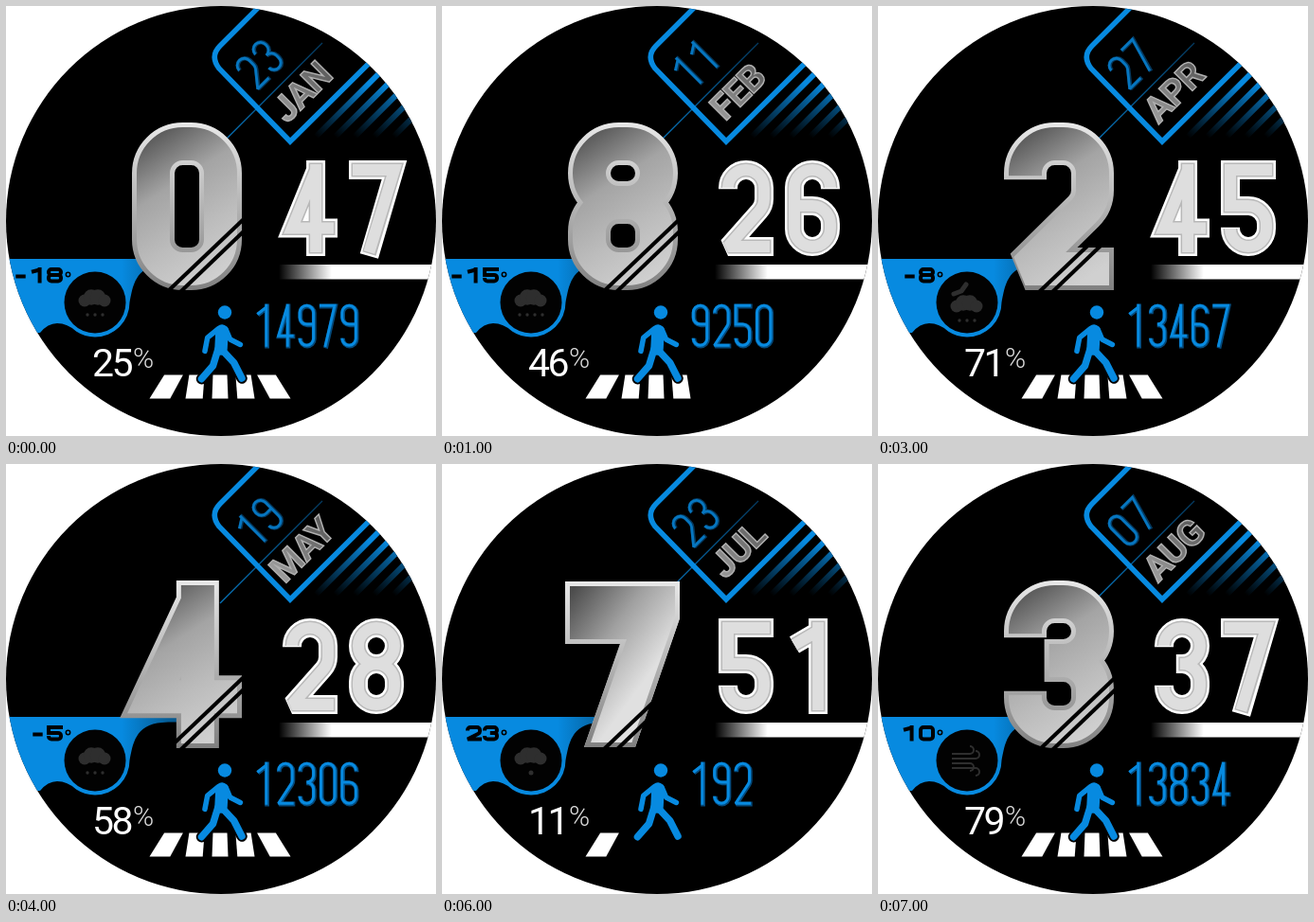
Recreate the animation shown at these times as an HTML page with a canvas. Size 454 px wide and 454 px high, loop 8 s.

```html
<!DOCTYPE html>
<html lang="en">
<head>
<meta charset="utf-8">
<title>Watch face</title>
<style>
html, body { margin: 0; width: 100%; height: 100%; overflow: hidden; background: #fff; }
canvas { display: block; width: 454px; height: 454px; }
</style>
</head>
<body>
<canvas id="face" width="454" height="454"></canvas>
<script>
const ctx = document.getElementById('face').getContext('2d');
const BLUE = '#078ae0';
const STEP_MS = 1000;

// month, day, hour, minute, temperature, weather, battery, steps
const states = [
  'JAN 23 0 47 -18 rain 25 14979',
  'FEB 11 8 26 -15 snow 46 9250',
  'MAR 15 7 32 0 snow 3 6491',
  'APR 27 2 45 -8 moon 71 13467',
  'MAY 19 4 28 -5 rain 58 12306',
  'JUN 03 5 43 -13 drop 13 5640',
  'JUL 23 7 51 23 drop 11 192',
  'AUG 07 3 37 10 wind 79 13834',
].map(text => text.split(' '));

// Each digit walks over named nodes; a capital letter rounds that corner.
const walks = {
  0: 'hBFEAh', 1: 'ij xy', 2: 'sABDer', 3: 'sABDg gDFEu', 4: 'zwo xy',
  5: 'qacDFEu', 6: 'tBAEFDc', 7: 'pbn', 8: 'hBDCAh kDFECk', 9: 'uEFBACd', '-': 'lm',
};

// e and f are half the stroke relative to the width and height of the box.
function nodes(e, f) {
  const mid = 0.47, end = 0.15 + 0.8 * f, stem = 0.66, bar = 0.76;
  return {
    a: [0, 0], b: [1, 0], c: [0, mid], d: [1, mid], e: [0, 1], f: [1, 1],
    h: [.5, 0], k: [.5, mid], g: [.6 - e, mid],
    s: [0, end], t: [1, end], u: [0, 1 - end],
    p: [-e, 0], q: [1 + e, 0], r: [1 + e, 1], n: [.3, 1 + f],
    i: [0, .22], j: [stem, .04], x: [stem, -f], y: [stem, 1 + f],
    z: [1 + e, bar], w: [0, bar], o: [stem, 0], l: [.1, .6], m: [.9, .6],
  };
}

function digit(d, x, y, w, h, width, color) {
  const r = Math.min(w / 2, h * 0.235);
  const grid = nodes(width / 2 / w, width / 2 / h);
  const at = key => {
    const [px, py] = grid[key.toLowerCase()];
    return [x + px * w, y + py * h];
  };
  ctx.beginPath();
  for (const walk of walks[d].split(' ')) {
    [...walk].forEach((key, i) => {
      if (!i) ctx.moveTo(...at(key));
      else if (key < 'a') ctx.arcTo(...at(key), ...at(walk[i + 1]), r);
      else ctx.lineTo(...at(key));
    });
  }
  ctx.lineCap = 'butt';
  ctx.lineJoin = 'miter';
  ctx.miterLimit = 2;
  ctx.lineWidth = width;
  ctx.strokeStyle = color;
  ctx.stroke();
}

function number(text, x, y, w, h, pitch, width, color) {
  [...text].forEach((d, i) => digit(d, x + i * pitch, y, w, h, width, color));
}

function gradient(x0, y0, x1, y1, ...colors) {
  const g = ctx.createLinearGradient(x0, y0, x1, y1);
  colors.forEach((c, i) => g.addColorStop(i / (colors.length - 1), c));
  return g;
}

function line(pts, width, color, cap = 'butt') {
  ctx.beginPath();
  pts.forEach(([x, y]) => ctx.lineTo(x, y));
  ctx.lineWidth = width;
  ctx.strokeStyle = color;
  ctx.lineCap = cap;
  ctx.lineJoin = cap === 'round' ? 'round' : 'miter';
  ctx.stroke();
}

function polygon(pts, color) {
  ctx.beginPath();
  pts.forEach(([x, y]) => ctx.lineTo(x, y));
  ctx.closePath();
  ctx.fillStyle = color;
  ctx.fill();
}

function disc(x, y, r, color) {
  ctx.beginPath();
  ctx.arc(x, y, r, 0, 7);
  ctx.fillStyle = color;
  ctx.fill();
}

function tilted(x, y, draw) {
  ctx.save();
  ctx.translate(x, y);
  ctx.rotate(-Math.PI / 4);
  draw();
  ctx.restore();
}

function drawDate(day, month) {
  line([[334, 39], [226, 147]], 1.2, gradient(334, 39, 226, 147, '#043a60', '#0776be'));
  ctx.save();
  ctx.beginPath();
  ctx.rect(300, 0, 154, 139);
  ctx.clip();
  for (let i = 0; i < 5; i++) {
    const sum = 465 + i * 20.5;
    line([[sum - 140, 140], [sum - 40, 40]], 6, gradient(sum - 138, 138, sum - 82, 82, '#000', BLUE));
  }
  ctx.restore();

  ctx.beginPath();
  ctx.moveTo(272, -4);
  ctx.lineTo(226, 42);
  ctx.quadraticCurveTo(215, 53, 225, 66);
  ctx.lineTo(300, 143);
  ctx.lineTo(420, 24);
  ctx.lineWidth = 5.5;
  ctx.lineJoin = 'miter';
  ctx.strokeStyle = BLUE;
  ctx.stroke();

  tilted(267.5, 61, () => {
    number(day, -19.5, -17, 15, 35, 24, 4.5, '#04395f');
    number(day, -20, -17.5, 15, 35, 24, 2.8, '#0676c0');
  });
  tilted(312, 90.5, () => {
    ctx.font = '700 38px Roboto, sans-serif';
    ctx.letterSpacing = '-1px';
    ctx.textAlign = 'center';
    ctx.lineWidth = 1.5;
    ctx.strokeStyle = '#b0b0b0';
    ctx.fillStyle = gradient(-36, 0, 36, 0, '#9c9c9c', '#5c5c5c');
    ctx.fillText(month, 0, 13.5);
    ctx.strokeText(month, 0, 13.5);
    ctx.letterSpacing = '0px';
  });
}

function drawPanel() {
  const x = 94, y = 313, r = 36.5;
  ctx.beginPath();
  ctx.moveTo(0, 267);
  ctx.lineTo(215, 267);
  ctx.bezierCurveTo(206, 276, 185, 271, 165, 273);
  ctx.bezierCurveTo(136, 275, 134, 296, x + r, y);
  ctx.arc(x, y, r, 0, 2.15);
  ctx.quadraticCurveTo(65, 335, 54, 335);
  ctx.quadraticCurveTo(44, 335, 36, 345);
  ctx.lineTo(0, 345);
  ctx.closePath();
  ctx.fillStyle = gradient(122, 0, 215, 0, BLUE, '#05609c', '#02365a');
  ctx.fill();
  disc(x, y, r - 4, '#020202');
}

function drawSky(kind) {
  const gray = '#2e2e2e';
  if (kind === 'wind') {
    for (let i = 0; i < 4; i++) {
      const y = 306 + i * 5, turn = i < 2 ? -1 : 1, tip = 97 + (i % 2) * 6;
      ctx.beginPath();
      ctx.moveTo(78, y);
      ctx.lineTo(tip, y);
      ctx.arc(tip, y + turn * 4, 4, -turn * Math.PI / 2, turn * Math.PI / 2, turn < 0);
      ctx.lineWidth = 2;
      ctx.strokeStyle = gray;
      ctx.stroke();
    }
    return;
  }
  const moon = kind === 'moon', top = moon ? 317 : 311;
  if (moon) line([[80, 304], [88, 301], [93, 294]], 5, gray, 'round');
  for (let i = 0; i < 4; i++) {
    const bulge = Math.sin(i * Math.PI / 3);
    disc(83 + i * 7, top - bulge * 4, 6.5 + bulge * 2, gray);
  }
  const count = { drop: 1, rain: 3, snow: 4 }[kind] || 3;
  for (let i = 0; i < count; i++) {
    disc(94 + (i - (count - 1) / 2) * 8, top + 15, count > 1 ? 1.7 : 2.5, gray);
  }
}

function drawTemp(temp) {
  number(temp, 45 - (temp.length - 1) * 18, 278, 13, 12.5, 18, 4, '#000');
  ctx.beginPath();
  ctx.arc(65.5, 283.5, 2.2, 0, 7);
  ctx.lineWidth = 1.5;
  ctx.strokeStyle = '#000';
  ctx.stroke();
}

function drawHour(hour) {
  const rim = gradient(0, 123, 0, 300, '#e8e8e8', '#b4b4b4', '#808080');
  const fill = gradient(138, 150, 225, 285, '#5c5c5c', '#a4a4a4', '#bcbcbc', '#d0d0d0');
  if (hour === '7') {
    ctx.save();
    polygon([[130, 124], [251, 124], [251, 163], [204, 299], [150, 299], [188, 190], [130, 190]],
      gradient(140, 130, 235, 200, '#4c4c4c', '#a0a0a0', '#e0e0e0'));
    ctx.clip();
    ctx.lineWidth = 10;
    ctx.strokeStyle = rim;
    ctx.stroke();
    ctx.restore();
  } else {
    digit(hour, 155.5, 145.5, 71, 132, 45, rim);
    digit(hour, 155.5, 145.5, 71, 132, 35, fill);
  }
  line([[170, 302], [252, 224]], 4, '#000');
  line([[184, 302], [254, 235]], 4, '#000');
}

function drawMinutes(min) {
  for (const [width, color] of [[20, '#fff'], [15, '#b8b8b8'], [12, '#dedede']]) {
    number(min, 302, 173, 38, 81, 70, width, color);
  }
  ctx.fillStyle = gradient(288, 0, 344, 0, '#000', '#fff');
  ctx.fillRect(288, 273, 166, 15.5);
}

function drawBattery(level) {
  ctx.textAlign = 'left';
  ctx.fillStyle = '#fff';
  ctx.font = '400 41px Roboto, sans-serif';
  ctx.letterSpacing = '-2.5px';
  ctx.fillText(level, 91, 391);
  const x = 91 + ctx.measureText(level).width;
  ctx.letterSpacing = '0px';
  ctx.font = '300 30px Roboto, sans-serif';
  ctx.fillStyle = '#ddd';
  ctx.fillText('%', x + 2, 382);
}

function drawCrossing(steps) {
  const bars = Math.min(5, 1 + Math.floor(steps / 3000));
  for (let i = 0; i < bars; i++) {
    const u = i - 2;
    const top = 226 + 24.5 * u, topHalf = 7.5 + 0.6 * u * u;
    const base = 226 + 23 * u + 4.4 * u * Math.abs(u), baseHalf = 8.5 + 0.6 * u * u;
    polygon([[top - topHalf, 389.5], [top + topHalf, 389.5], [base + baseHalf, 414.5], [base - baseHalf, 414.5]], '#fff');
  }
}

// A two-part limb; angles are degrees from straight down, positive to the right.
function limb(x, y, upper, lower, length, width, color) {
  const pts = [[x, y]];
  for (const angle of [upper, lower]) {
    const a = angle * Math.PI / 180;
    x += Math.sin(a) * length;
    y += Math.cos(a) * length;
    pts.push([x, y]);
  }
  line(pts, width, color, 'round');
}

function drawWalker() {
  for (const [extra, color] of [[4, '#000'], [0, BLUE]]) {
    limb(224, 341, -51, -11, 14.5, 5.5 + extra, color);
    limb(232, 341, 23, 63, 12, 5.5 + extra, color);
    limb(224, 362, -17, -41, 18.5, 7.5 + extra, color);
    limb(228, 363, 43, 27, 18.5, 7.5 + extra, color);
    line([[228, 343], [227, 362]], 13.5 + extra, color, 'round');
    disc(231, 323.5, 7.2 + extra / 2, color);
  }
}

function drawSteps(steps) {
  number(steps, 266, 317, 14.5, 42, 22.4, 4.8, '#044a7c');
  number(steps, 265.3, 316.3, 14.5, 42, 22.4, 3, BLUE);
}

function draw([month, day, hour, min, temp, sky, battery, steps]) {
  ctx.fillStyle = '#fff';
  ctx.fillRect(0, 0, 454, 454);
  ctx.save();
  disc(227, 227, 227, '#000');
  ctx.clip();
  drawDate(day, month);
  drawPanel();
  drawSky(sky);
  drawTemp(temp);
  drawHour(hour);
  drawMinutes(min);
  drawBattery(battery);
  drawCrossing(steps);
  drawWalker();
  drawSteps(steps);
  ctx.restore();
}

function tick(now) {
  draw(states[Math.floor(now / STEP_MS) % states.length]);
  requestAnimationFrame(tick);
}
draw(states[0]);
requestAnimationFrame(tick);
</script>
</body>
</html>
```
